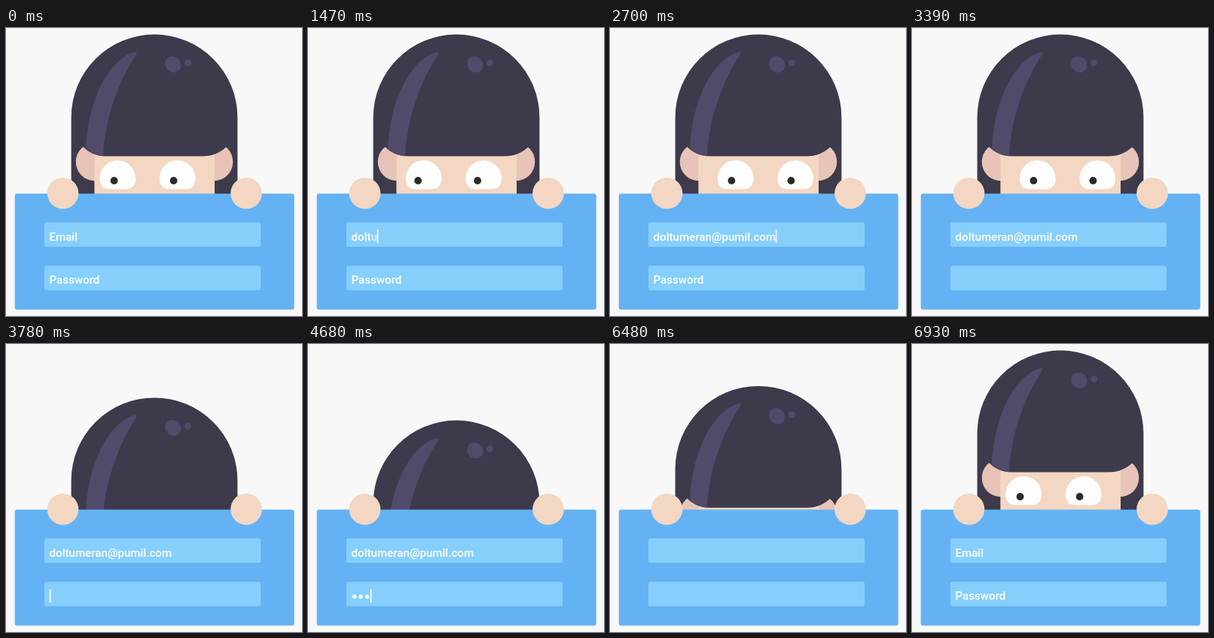
Animation, 393 px wide and 383 px high, one loop 7200 ms. Source, as an HTML page:

```html
<!DOCTYPE html>
<html lang="en">
<head>
<meta charset="utf-8">
<title>Shy login</title>
<style>
  html, body { margin: 0; width: 100%; height: 100%; overflow: hidden; background: #f8f8f8; }
  svg { display: block; width: 100%; height: 100%; }
  text { font: 500 15.1px Roboto, Inter, sans-serif; fill: #fff; }
  .hair { fill: #3d3a4c; }
  .shine { fill: #514a6a; }
  .skin { fill: #f3d7c2; }
  .ear { fill: #e7c4b7; }
  .field { fill: #86cffc; }
  .white { fill: #fff; }
</style>
</head>
<body>
<svg viewBox="0 0 393 383">
  <defs>
    <path id="eye" d="M0 200A23.8 24 0 0 1 47.6 200Q47.6 214.3 34 214.3H14Q0 214.3 0 200Z" fill="#fdfdfd"/>
  </defs>

  <g id="head">
    <path class="hair" d="M86.6 260V119A110.4 110.4 0 0 1 307.4 119V260Z"/>
    <circle class="ear" cx="118" cy="178" r="25.3"/>
    <circle class="ear" cx="276" cy="178" r="25.3"/>
    <path class="skin" d="M117.4 150H277V260H117.4Z"/>
    <path class="hair" d="M102 157.5Q114 170.5 133 170.5H261Q280 170.5 293 157.5V120H102Z"/>
    <path class="shine" d="M171 32C140 40 110 88 106 160Q116 169.5 129 170.5C131 120 150 70 172.5 36Q175 31 171 32Z"/>
    <ellipse class="shine" rx="11.2" ry="10.1" transform="translate(221.8 48.5) rotate(45)"/>
    <circle class="shine" cx="241.5" cy="46.5" r="4.5"/>
    <g id="eyes">
      <use href="#eye"/>
      <use href="#eye" x="79.5"/>
    </g>
    <g id="pupils" fill="#2b2a29">
      <circle cy="203" r="4.9"/>
      <circle cx="79" cy="203" r="4.9"/>
    </g>
  </g>

  <rect x="11.7" y="220.2" width="371" height="154.2" rx="3" fill="#64b2f4"/>
  <rect class="field" x="51" y="258.5" width="287" height="32.5" rx="2.5"/>
  <rect class="field" x="51" y="316.2" width="287" height="32.5" rx="2.5"/>
  <circle class="skin" cx="75.5" cy="219.7" r="20.8"/>
  <circle class="skin" cx="319" cy="219.7" r="20.8"/>

  <text id="emailHint" x="57.5" y="283">Email</text>
  <text id="passwordHint" x="57.5" y="340">Password</text>
  <text id="email" x="57.5" y="283"></text>
  <g id="dots" class="white"></g>
  <rect id="emailCaret" class="white" y="268" width="1.6" height="18"/>
  <rect id="passwordCaret" class="white" y="326" width="1.6" height="18"/>
</svg>

<script>
const LOOP = 7200;
const FADE = 100;
const ADDRESS = "doltumeran@pumil.com";
const DOT_COUNT = 6;
const DOT_GAP = 8.3;
const LETTER = { start: 1165, step: 66 };
const DOT = { start: 4260, step: 150 };

const $ = id => document.getElementById(id);
const clamp = v => Math.min(1, Math.max(0, v));
const ramp = (t, start, duration) => clamp((t - start) / duration);
const easeInOut = u => (1 - Math.cos(Math.PI * u)) / 2;
const easeOut = u => Math.sin(Math.PI / 2 * u);
const shown = (t, from, until) => ramp(t, from, FADE) - ramp(t, until, FADE);

function addChild(parent, tag, attributes, content = "") {
  const node = document.createElementNS("http://www.w3.org/2000/svg", tag);
  for (const name in attributes) node.setAttribute(name, attributes[name]);
  node.textContent = content;
  parent.append(node);
  return node;
}

const letters = [...ADDRESS].map(char => addChild($("email"), "tspan", {}, char));
const dots = Array.from({ length: DOT_COUNT }, (_, i) =>
  addChild($("dots"), "circle", { cx: 61.7 + DOT_GAP * i, cy: 336, r: 2.7 }));

// Fades typed items in one after another and returns how many have begun
function type(t, items, { start, step }) {
  items.forEach((item, i) =>
    item.setAttribute("fill-opacity", ramp(t, start + step * i, step)));
  return Math.min(items.length, Math.max(0, Math.floor((t - start) / step) + 1));
}

const setOpacity = (id, value) => $(id).setAttribute("opacity", value);
const move = (id, x, y = 0) => $(id).setAttribute("transform", `translate(${x} ${y})`);

function drawHead(t) {
  const hidden = easeInOut(ramp(t, 3400, 620)) - easeInOut(ramp(t, 6110, 750));
  move("head", 0, 93 * hidden);

  // The gaze returns to rest while the face is out of sight
  const gaze = t < 4500 ? t : 0;
  move("eyes", 124.4 + 18.6 * easeOut(ramp(gaze, 1170, 1600)));
  move("pupils", 143.6 - 5.7 * ramp(gaze, 0, 270) + 23.5 * easeOut(ramp(gaze, 1170, 1325)));
}

function drawForm(t) {
  setOpacity("emailHint", 1 - shown(t, 610, 6550));
  setOpacity("passwordHint", 1 - shown(t, 3270, 6550));

  const lettersTyped = type(t, letters, LETTER);
  const dotsTyped = type(t, dots, DOT);
  const filled = 1 - ramp(t, 6110, FADE);
  setOpacity("email", filled);
  setOpacity("dots", filled);

  const textWidth = lettersTyped && $("email").getSubStringLength(0, lettersTyped);
  $("emailCaret").setAttribute("x", 57.3 + textWidth);
  $("passwordCaret").setAttribute("x", 57.8 + DOT_GAP * dotsTyped);
  setOpacity("emailCaret", shown(t, 840, 2680));
  setOpacity("passwordCaret", shown(t, 3660, 5510));
}

const startTime = performance.now();
function frame() {
  const t = (performance.now() - startTime) % LOOP;
  drawHead(t);
  drawForm(t);
  requestAnimationFrame(frame);
}
frame();
</script>
</body>
</html>
```
